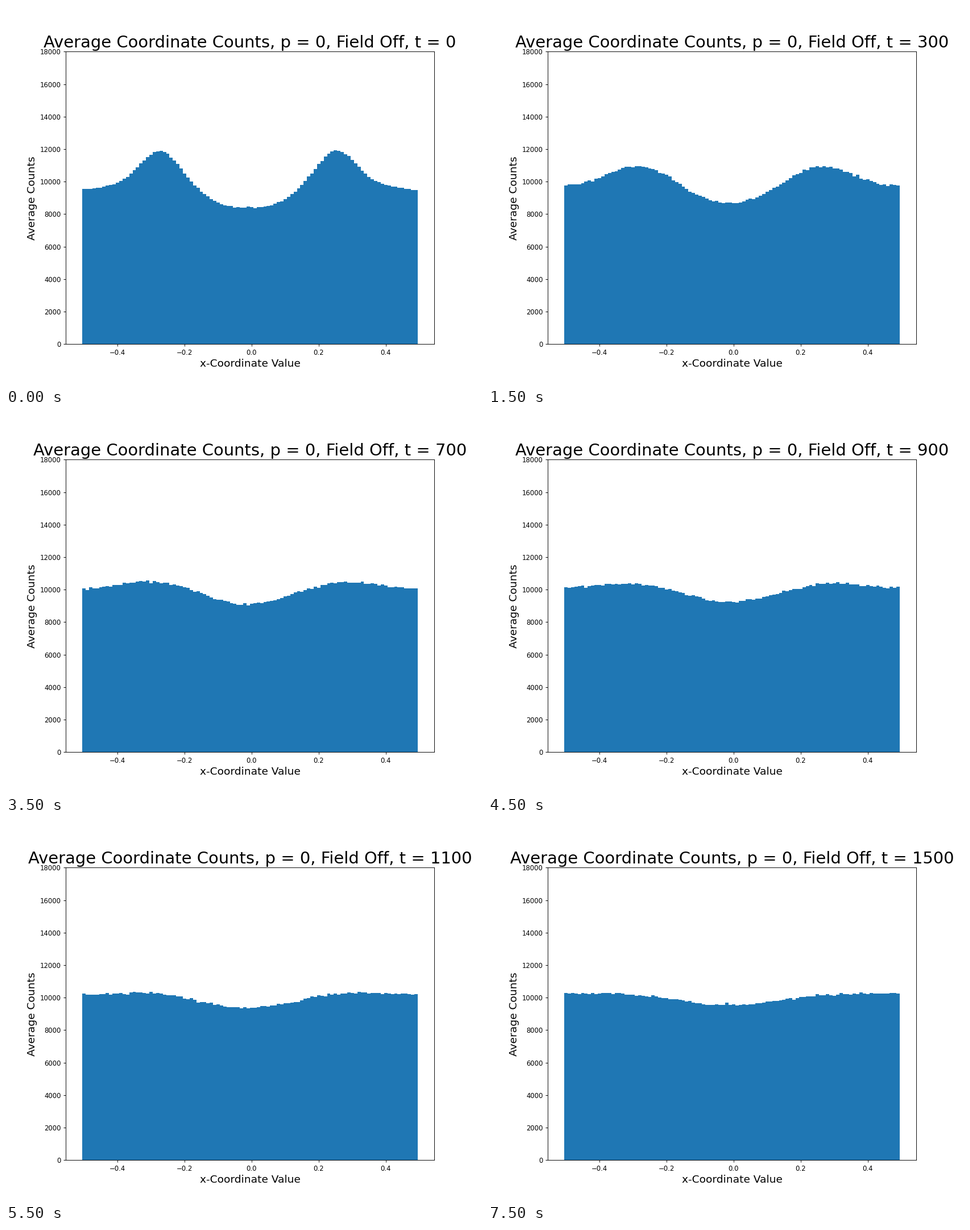
A matplotlib script for the animation above (8000 ms loop, 837 px wide and 669 px high).

```python
import numpy as np
import matplotlib.pyplot as plt
from matplotlib.animation import FuncAnimation

W, H, DPI = 837, 669, 83.7
FRAMES, INTERVAL, STEP = 16, 500, 100

# Cosine modes of the initial density; mode k decays as exp(-RATE k^2 t).
MODES = np.array([-654, -1351, 104, 391, -50, -82, 34, 14])
RATE = 0.000418
MEAN, CENTRE = 10000, -0.01

BINS = 100
edges = -0.505 + 0.01 * np.arange(BINS + 1)
x = edges[:-1] + 0.005
k = np.arange(1, len(MODES) + 1)
basis = np.cos(2 * np.pi * np.outer(x - CENTRE, k))


def counts(t):
    """Diffusing density at time t, with sampling noise."""
    noise = np.random.default_rng(t + 7).normal(size=BINS)
    sigma = 25 + 15 * min(t / 500, 1)
    return MEAN + basis @ (MODES * np.exp(-RATE * k**2 * t)) + sigma * noise


# The tiny excess keeps the canvas size from rounding down.
fig, ax = plt.subplots(figsize=((W + 0.001) / DPI, (H + 0.001) / DPI), dpi=DPI)
hist = ax.stairs(counts(0), edges, fill=True, color="#1f77b4")
ax.set_xlim(-0.555, 0.545)
ax.set_ylim(0, 18000)
ax.set_xlabel("x-Coordinate Value", fontsize=16)
ax.set_ylabel("Average Counts", fontsize=16)
title = ax.set_title("", fontsize=25)


def update(i):
    t = i * STEP
    hist.set_data(counts(t))
    title.set_text(f"Average Coordinate Counts, p = 0, Field Off, t = {t}")
    return hist, title


anim = FuncAnimation(fig, update, frames=FRAMES, interval=INTERVAL,
                     init_func=lambda: update(0), repeat=True, repeat_delay=0)
plt.show()
```
